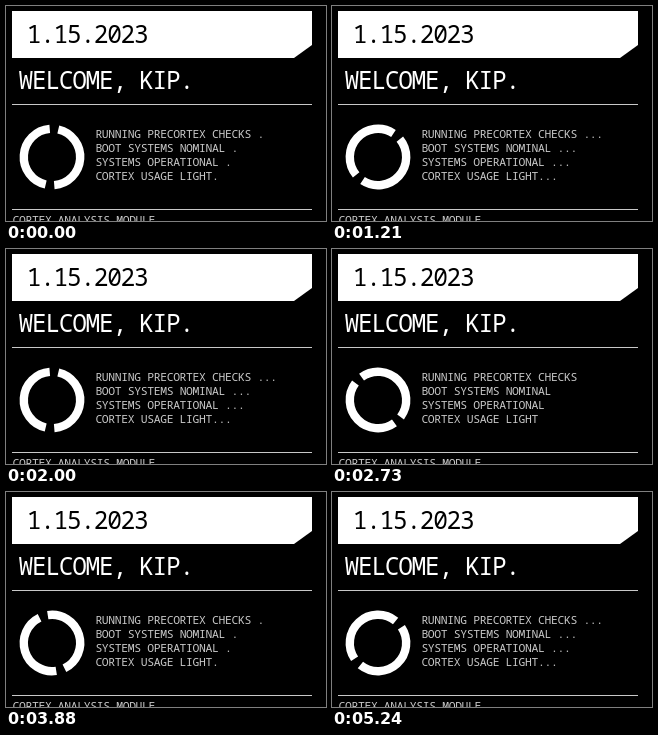
An HTML page that plays this animation: 320x215 px, repeating every 5270 ms.

```html
<!DOCTYPE html>
<html lang="en">
<head>
<meta charset="utf-8">
<title>Cortex boot panel</title>
<style>
  html, body { margin: 0; width: 100%; height: 100%; overflow: hidden; background: #000; }
  svg { display: block; width: 320px; height: 215px; }
  text {
    font-family: "Noto Sans Mono", "DejaVu Sans Mono", monospace;
    font-stretch: condensed;
    white-space: pre;
  }
  .big { font-size: 24.5px; font-weight: 500; }
  .small { font-size: 11.4px; fill: #c8c8c8; }
</style>
</head>
<body>
<svg viewBox="0 0 320 215">
  <rect width="320" height="215" fill="#000"/>
  <path d="M6 5H306V39L288 52H6Z" fill="#fff"/>
  <text class="big" x="20.8" y="37.4">1.15.2023</text>
  <text class="big" x="12.6" y="83.4" fill="#fff">WELCOME, KIP.</text>
  <path d="M6 98.5H306M6 203.5H306" stroke="#c8c8c8"/>
  <g id="ring" fill="none" stroke="#fff" stroke-width="8.4"></g>
  <g id="log"></g>
  <text class="small" x="6.5" y="218">CORTEX ANALYSIS MODULE</text>
</svg>
<script>
  const LOOP = 5270, TURN = 2000, DOT_STEP = 1000, DOT_LEAD = 850;
  const CX = 46, CY = 151, R = 28.2, GAP = 17.5, TILT = 4;
  const BIG_PITCH = 13.4, SMALL_PITCH = 6.48;
  const lines = ["RUNNING PRECORTEX CHECKS ", "BOOT SYSTEMS NOMINAL ",
                 "SYSTEMS OPERATIONAL ", "CORTEX USAGE LIGHT"];
  const ring = document.getElementById("ring");
  const log = document.getElementById("log");

  function add(parent, tag, attrs) {
    const el = document.createElementNS("http://www.w3.org/2000/svg", tag);
    for (const key in attrs) el.setAttribute(key, attrs[key]);
    return parent.appendChild(el);
  }

  // Point on the ring, in degrees clockwise from the top
  function at(deg) {
    const a = deg * Math.PI / 180;
    return `${CX + R * Math.sin(a)} ${CY - R * Math.cos(a)}`;
  }

  // Track monospaced text so that each cell is one pitch wide
  function track(el, pitch) {
    const cell = el.getComputedTextLength() / el.textContent.length;
    el.style.letterSpacing = `${pitch - cell}px`;
  }

  for (const from of [0, 180]) {
    const d = `M${at(from + GAP / 2)}A${R} ${R} 0 0 1 ${at(from + 180 - GAP / 2)}`;
    add(ring, "path", { d });
  }
  const rows = lines.map((line, i) => {
    const row = add(log, "text", { class: "small", x: 89.4, y: 132 + 14 * i });
    row.textContent = line;
    return row;
  });
  document.querySelectorAll(".big").forEach(el => track(el, BIG_PITCH));
  document.querySelectorAll(".small").forEach(el => track(el, SMALL_PITCH));

  function draw(now) {
    const t = now % LOOP;
    ring.setAttribute("transform", `rotate(${TILT + t / TURN * 360} ${CX} ${CY})`);
    const dots = ".".repeat((1 + Math.floor((t + DOT_LEAD) / DOT_STEP)) % 4);
    rows.forEach((row, i) => {
      const text = lines[i] + dots;
      if (row.textContent !== text) row.textContent = text;
    });
  }

  function tick() {
    draw(performance.now());
    requestAnimationFrame(tick);
  }
  tick();
</script>
</body>
</html>
```
